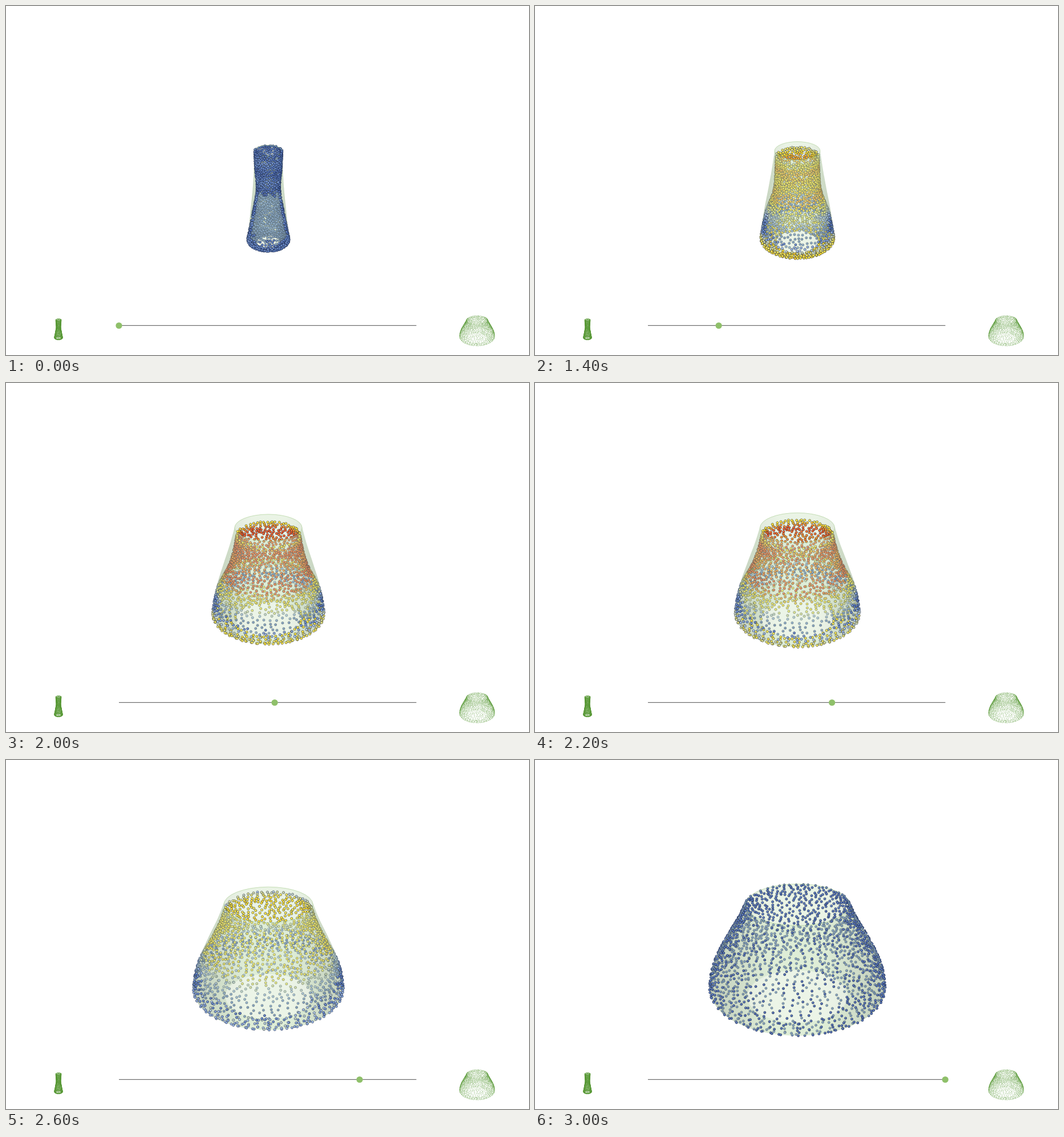
Recreate the animation shown at these times as an HTML page with a canvas. Size 917x611 px, loop 4 s.

```html
<!DOCTYPE html>
<html lang="en">
<head>
<meta charset="utf-8">
<title>Morphing shell</title>
<style>
  html, body { margin: 0; width: 100%; height: 100%; overflow: hidden; background: #fff; }
  canvas { display: block; width: 100%; height: 100%; }
</style>
</head>
<body>
<canvas id="stage" width="917" height="611"></canvas>
<script>
const ctx = document.getElementById('stage').getContext('2d');
const TAU = Math.PI * 2, CX = 460, STEPS = 21, COUNT = 1750;

// Columns: position along the wall, start height, start radius of the beads,
// start radius of the shell, end height, end radius of both
const Y0 = 1, BEADS = 2, SHELL = 3, Y1 = 4, R1 = 5;
const KNOTS = [
  [0, 253.5, 24, 24, 253.5, 91],
  [.19, 285, 22.5, 25.5, 285, 106],
  [.39, 320, 20, 27.5, 318, 125],
  [.65, 365, 27.5, 32, 360, 146],
  [.82, 398, 34, 35, 390, 153],
  [.91, 411, 35.5, 36, 407, 147],
  [1, 413, 22, 22, 414, 88]
];
const COLORS = [
  [0, 68, 98, 170], [.16, 92, 128, 198], [.33, 165, 192, 232], [.46, 245, 232, 85],
  [.64, 253, 222, 34], [.8, 248, 152, 34], [1, 240, 82, 26]
];

const clamp = (x, a, b) => Math.min(b, Math.max(a, x));
const mix = (a, b, t) => a + (b - a) * t;

let seed = 7;
function random() {
  seed = (seed * 1664525 + 1013904223) >>> 0;
  return seed / 4294967296;
}

function slope(i, col) {
  const a = KNOTS[Math.max(0, i - 1)], b = KNOTS[Math.min(KNOTS.length - 1, i + 1)];
  return (b[col] - a[col]) / (b[0] - a[0]);
}

function spline(u, col) {
  let i = 0;
  while (i < KNOTS.length - 2 && u > KNOTS[i + 1][0]) i++;
  const a = KNOTS[i], b = KNOTS[i + 1], h = b[0] - a[0], t = (u - a[0]) / h;
  const s = t * t * (3 - 2 * t);
  return mix(a[col], b[col], s)
    + h * (t * (1 - t) ** 2 * slope(i, col) - t * t * (1 - t) * slope(i + 1, col));
}

const tilt = y => .4 + .00075 * (y - 253.5);

function ring(u, p, start = SHELL) {
  const y = mix(spline(u, Y0), spline(u, Y1), p);
  const r = mix(spline(u, start), spline(u, R1), p);
  return { y, r, ry: r * tilt(y) };
}

// Evenly scattered points: keep the candidate farthest from its neighbours
function scatter() {
  const points = [];
  while (points.length < COUNT) {
    let best, bestGap = -1;
    for (let c = 0; c < 10; c++) {
      let u = random();
      while (random() * 48 > spline(u, BEADS) + 12 * u) u = random();
      const angle = random() * TAU;
      let gap = 1e9;
      for (const q of points) {
        let turn = Math.abs(q.angle - angle);
        turn = Math.min(turn, TAU - turn) * 45;
        const along = (q.u - u) * 172;
        gap = Math.min(gap, turn * turn + along * along);
      }
      if (gap > bestGap) { bestGap = gap; best = { u, angle }; }
    }
    best.sin = Math.sin(best.angle);
    best.cos = Math.cos(best.angle);
    best.noise = random();
    points.push(best);
  }
  return points.sort((a, b) => a.cos - b.cos);
}
const points = scatter();

function strain(u, p) {
  const amount = Math.sin(Math.PI * p);
  if (u > .74) {
    const foot = Math.min(.6, .9 * amount) * (1 - .9 * p ** 3);
    return foot * clamp((u - .74) / .18, 0, 1);
  }
  const wave = .93 + .09 * Math.cos((u - .1) * TAU / .3);
  const rim = clamp(.62 + u * 3.5, 0, 1);
  return amount * wave * rim * clamp((.74 - u) / .27, 0, 1);
}

function colorOf(v) {
  v = clamp(v, 0, 1);
  let i = 0;
  while (i < COLORS.length - 2 && v > COLORS[i + 1][0]) i++;
  const a = COLORS[i], b = COLORS[i + 1], t = (v - a[0]) / (b[0] - a[0]);
  return [1, 2, 3].map(k => Math.round(mix(a[k], b[k], t)));
}

function place(pt, p) {
  const { y, r } = ring(pt.u, p, BEADS);
  const lag = Math.sin(Math.PI * p) ** .8, near = clamp(1 - pt.u / .65, 0, 1);
  const radius = r - lag * (4 * near + 4 * Math.sin(Math.PI * near));
  const height = y + lag * 11 * near;
  return [CX + radius * pt.sin, height + radius * tilt(height) * pt.cos];
}

function disc(x, y, r, fill) {
  ctx.beginPath();
  ctx.arc(x, y, r, 0, TAU);
  ctx.fillStyle = fill;
  ctx.fill();
}

function drawBead(pt, p) {
  const [x, y] = place(pt, p);
  let v = strain(pt.u, p) + .1 * pt.noise;
  if (p === 0) v += .12 * Math.sin(pt.u * 16) ** 2;
  const rgb = colorOf(v);
  disc(x, y, 2.1, `rgb(${rgb})`);
  ctx.strokeStyle = 'rgba(22,30,52,.72)';
  ctx.lineWidth = .7;
  ctx.stroke();
  disc(x - .5, y - .6, .8, `rgb(${rgb.map(c => Math.round(mix(c, 255, .35)))})`);
}

function ellipse(e) {
  ctx.moveTo(CX + e.r, e.y);
  ctx.ellipse(CX, e.y, e.r, e.ry, 0, 0, TAU);
}

// One wall of the shell: its whole outline without the opening seen through it
function drawWall(p, opening, alpha) {
  const hole = ring(opening, p), wide = ring(.84, p).r;
  ctx.save();
  ctx.beginPath();
  ctx.rect(0, 0, 917, 611);
  ellipse(hole);
  ctx.clip('evenodd');
  ctx.beginPath();
  for (let i = 0; i <= 100; i++) ellipse(ring(i / 100, p));
  const shade = ctx.createLinearGradient(CX - wide, 0, CX + wide, 0);
  const edge = `rgba(158,178,148,${alpha})`, middle = `rgba(202,226,190,${alpha})`;
  shade.addColorStop(0, edge);
  shade.addColorStop(.35, middle);
  shade.addColorStop(.65, middle);
  shade.addColorStop(1, edge);
  ctx.fillStyle = shade;
  ctx.fill();
  ctx.restore();
}

function isOutside(pt, p) {
  const side = Math.abs(pt.sin) > .93, u = pt.u + .1 * (pt.noise - .5);
  if (p < .1) return u < .4 || u > .82 || side;
  if (p === 1) return pt.noise < .5 || side;
  return u > .78 || (side && u > .65);
}

function drawShell(p) {
  const front = points.filter(pt => pt.cos >= 0);
  drawWall(p, 1, .4);
  points.filter(pt => pt.cos < 0).forEach(pt => drawBead(pt, p));
  front.filter(pt => !isOutside(pt, p)).forEach(pt => drawBead(pt, p));
  drawWall(p, 0, .37);
  ctx.beginPath();
  ellipse(ring(0, p));
  ctx.strokeStyle = 'rgba(150,195,120,.6)';
  ctx.lineWidth = .8;
  ctx.stroke();
  front.filter(pt => isOutside(pt, p)).forEach(pt => drawBead(pt, p));
}

function drawIcon(x, p) {
  for (const pt of points) {
    const [px, py] = place(pt, p);
    disc(x + (px - CX) * .2, 498.5 + py * .2, .5, 'rgba(88,152,52,.72)');
  }
}

function drawSlider(p) {
  ctx.fillStyle = '#6c6c6c';
  ctx.fillRect(198, 558.8, 521.5, 1.2);
  disc(198 + 521.3 * p, 559.5, 5.6, '#8fc06a');
}

let shown = -1;
function tick() {
  const time = performance.now() % 4000;
  const step = clamp(Math.floor((time - 1000) / 100) + 1, 0, STEPS);
  if (step !== shown) {
    shown = step;
    const p = step / STEPS;
    ctx.fillStyle = '#fff';
    ctx.fillRect(0, 0, 917, 611);
    drawShell(p);
    drawIcon(92, 0);
    drawIcon(826, 1);
    drawSlider(p);
  }
  requestAnimationFrame(tick);
}
tick();
</script>
</body>
</html>
```
